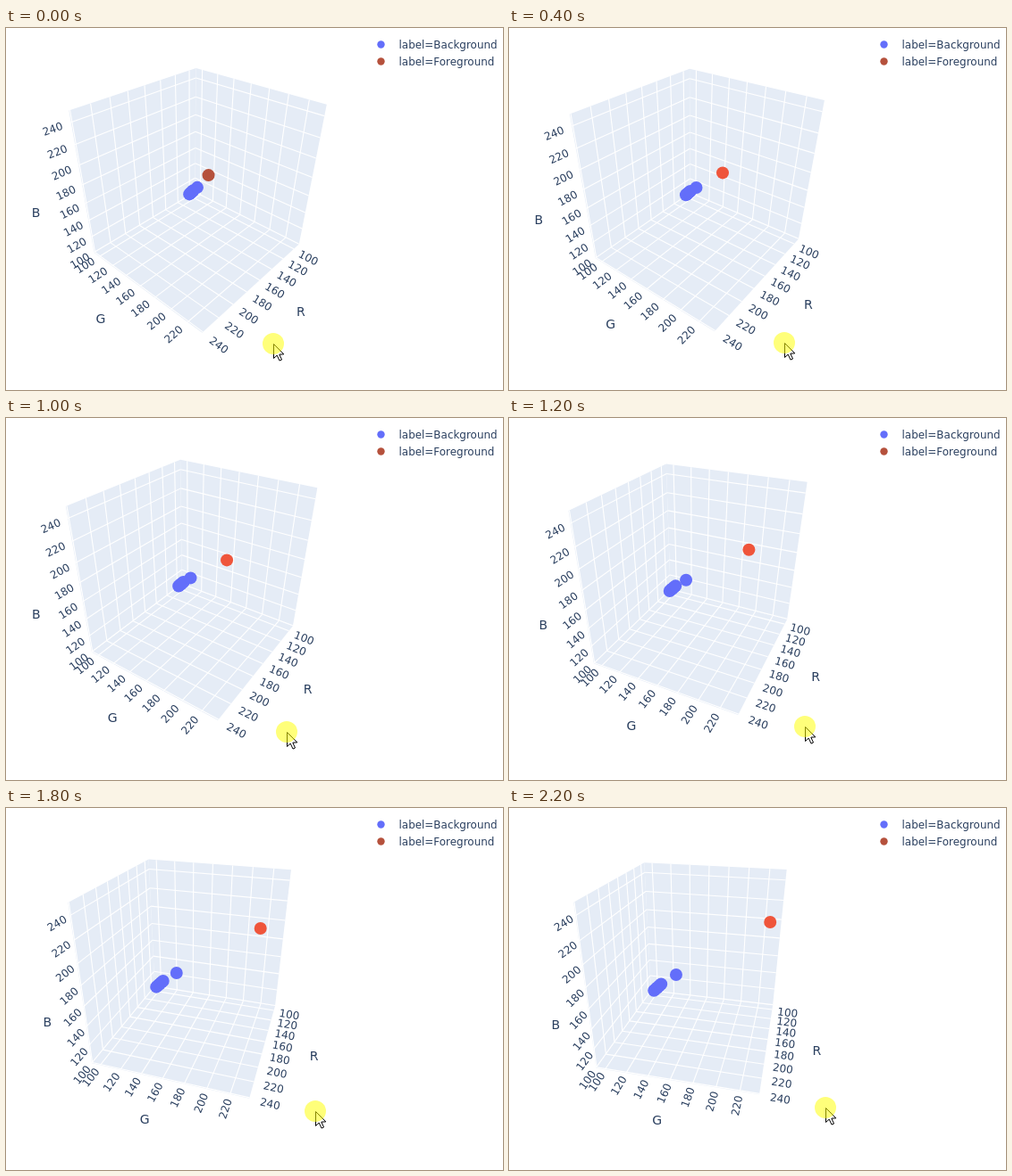
These frames come from a looping animation (556x406 px, 2400 ms). An HTML page with a canvas:

```html
<!DOCTYPE html>
<html lang="en">
<head>
<meta charset="utf-8">
<title>Colour scatter</title>
<style>
  html, body { margin: 0; width: 100%; height: 100%; overflow: hidden; background: #fff; }
  canvas { display: block; }
</style>
</head>
<body>
<canvas id="stage" width="556" height="406"></canvas>
<script>
const ctx = document.getElementById('stage').getContext('2d');
const FONT = '"DejaVu Sans", Verdana, sans-serif';
const INK = '#2a3f5f', BLUE = '#636efa', RED = '#ef553b', DULL_RED = '#b5513c';
const STEP = 200, STEPS = 12;

// Pointer drag: distance moved to the right by a given step, straight in between
const DRAG = [[0, 0], [2, 9], [5, 15], [6, 32], [8, 39], [9, 47], [11, 55]];
const DRAG_WIDTH = 55, DRAG_RISE = 18;

// Axes in the order R, G, B
const MIN = [90, 91.5, 99.5], MAX = [241, 236, 250];
const PIVOT = [178.5, 165.1, 156.4], UNIT = 75;
const FOCAL = 467, DISTANCE = 5.11, CX = 206, CY = 203;
const TICK_GAP = 17, TITLE_GAP = 47;

// The background samples are a tight streak and one point apart from it
const STREAK = [[113, 103.5, 113.3], [118, 114, 125.3]];
const LONE = [137.4, 137.1, 148.5];
const FOREGROUND = [234, 232, 244];

// Labelled edges: running axis, edge start, axis along which labels move outwards
const EDGES = [
  { axis: 0, name: 'R', at: [0, MAX[1], MIN[2] - 1.5], out: 1 },
  { axis: 1, name: 'G', at: [MAX[0], 0, MIN[2]], out: 0 },
  { axis: 2, name: 'B', at: [MAX[0], MIN[1], 0], out: 0 }
];

const mix = (a, b, t) => a + (b - a) * t;

function dragAt(step) {
  const i = DRAG.findIndex(([s], n) => n > 0 && step <= s);
  const [s0, d0] = DRAG[i - 1], [s1, d1] = DRAG[i];
  return mix(d0, d1, (step - s0) / (s1 - s0));
}

// Turntable camera, driven by the pointer's travel in x and y
function camera(dx, dy) {
  const a = (42.7 - 0.527 * dx) * Math.PI / 180;
  const e = (35.5 - 0.433 * dy) * Math.PI / 180;
  const sa = Math.sin(a), ca = Math.cos(a), se = Math.sin(e), ce = Math.cos(e);
  return point => {
    const [x, y, z] = point.map((v, i) => (v - PIVOT[i]) / UNIT);
    const flat = x * ca + y * sa;
    const k = FOCAL / (DISTANCE - flat * ce - z * se);
    return [CX + k * (y * ca - x * sa), CY - k * (z * ce - flat * se)];
  };
}

function moved(point, axis, value) {
  const p = [...point];
  p[axis] = value;
  return p;
}

function ticks(axis) {
  const list = [];
  for (let v = 100; v < MAX[axis]; v += 20) list.push(v);
  return list;
}

function path(points) {
  ctx.beginPath();
  points.forEach(p => ctx.lineTo(...p));
}

function dot([x, y], r, color) {
  ctx.fillStyle = color;
  ctx.beginPath();
  ctx.arc(x, y, r, 0, 2 * Math.PI);
  ctx.fill();
}

function label(text, [x, y], size, angle = 0) {
  ctx.save();
  ctx.translate(x, y);
  ctx.rotate(angle);
  ctx.font = `${size}px ${FONT}`;
  ctx.textAlign = 'center';
  ctx.fillStyle = INK;
  ctx.fillText(text, 0, size * 0.36);
  ctx.restore();
}

// Wall of the box spanned by axes a and b
function drawFace(project, a, b) {
  const at = (u, v) => project(moved(moved(MIN, a, u), b, v));
  path([at(MIN[a], MIN[b]), at(MAX[a], MIN[b]), at(MAX[a], MAX[b]), at(MIN[a], MAX[b])]);
  ctx.fillStyle = '#e5ecf6';
  ctx.fill();
  ctx.strokeStyle = '#fff';
  ctx.lineWidth = 1.1;
  for (const u of ticks(a)) {
    path([at(u, MIN[b]), at(u, MAX[b])]);
    ctx.stroke();
  }
  for (const v of ticks(b)) {
    path([at(MIN[a], v), at(MAX[a], v)]);
    ctx.stroke();
  }
}

function drawEdge(project, { axis, name, at, out }) {
  const shifted = (p, by) => project(moved(p, out, p[out] + by));
  for (const v of ticks(axis)) {
    const p = moved(at, axis, v);
    const [x0, y0] = project(p), [x1, y1] = shifted(p, TICK_GAP);
    label(v, [x1, y1], 12, Math.atan((y1 - y0) / (x1 - x0)));
  }
  label(name, shifted(moved(at, axis, (MIN[axis] + MAX[axis]) / 2), TITLE_GAP), 14);
}

function drawPoints(project, hovered) {
  for (let t = 0; t <= 1; t += 0.25) {
    dot(project(STREAK[0].map((v, i) => mix(v, STREAK[1][i], t))), 7, BLUE);
  }
  dot(project(LONE), 7, BLUE);
  dot(project(FOREGROUND), 7, hovered ? DULL_RED : RED);
}

function drawLegend() {
  ctx.font = `11.95px ${FONT}`;
  ctx.textAlign = 'left';
  [['label=Background', BLUE], ['label=Foreground', DULL_RED]].forEach(([text, color], i) => {
    const y = 18.5 + 19 * i;
    dot([419.5, y], 4.2, color);
    ctx.fillStyle = INK;
    ctx.fillText(text, 439.5, y + 4.5);
  });
}

// Arrow under a translucent yellow highlight
function drawPointer(x, y) {
  path([[0, 0], [0, 16], [3.7, 12.6], [6.5, 18.6], [9, 17.5], [6.3, 11.6], [11.3, 11.4]]
    .map(([dx, dy]) => [x + 0.5 + dx, y + 0.5 + dy]));
  ctx.closePath();
  ctx.fillStyle = '#fff';
  ctx.fill();
  ctx.strokeStyle = '#000';
  ctx.lineWidth = 1;
  ctx.stroke();
  dot([x, y], 12, 'rgba(255, 255, 0, .52)');
}

function draw() {
  const step = Math.floor(performance.now() / STEP) % STEPS;
  const dx = dragAt(step);
  const dy = DRAG_RISE * (dx / DRAG_WIDTH) ** 1.6;
  const project = camera(dx, dy);
  ctx.fillStyle = '#fff';
  ctx.fillRect(0, 0, 556, 406);
  drawFace(project, 0, 1);
  drawFace(project, 0, 2);
  drawFace(project, 1, 2);
  EDGES.forEach(edge => drawEdge(project, edge));
  drawPoints(project, step === 0);
  drawLegend();
  drawPointer(Math.round(299 + dx), Math.round(354 - dy));
  requestAnimationFrame(draw);
}
draw();
</script>
</body>
</html>
```
